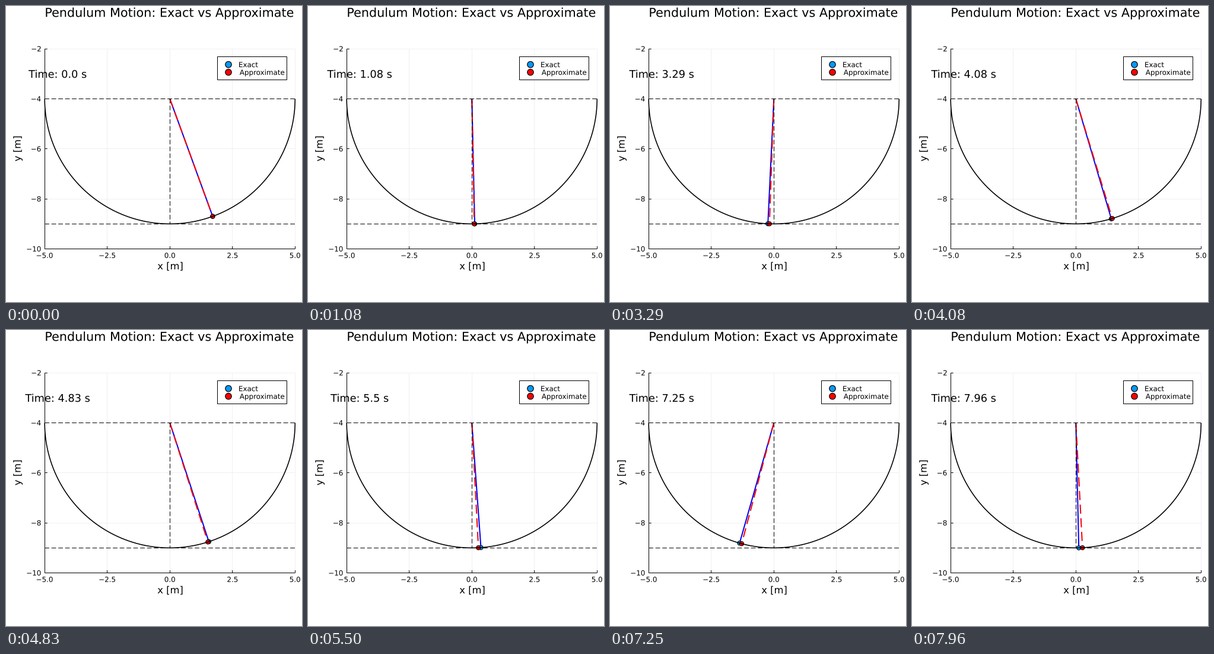
These frames come from a looping animation (499 px wide and 499 px high, 8000 ms). A matplotlib script:

```python
import math

import matplotlib.pyplot as plt
import numpy as np
from matplotlib.animation import FuncAnimation
from matplotlib.patches import Circle, PathPatch, Rectangle
from matplotlib.textpath import TextPath
from matplotlib.transforms import Affine2D

SIZE, DPI = 499, 100
PX = 72 / DPI                      # points per pixel
FPS, STEPS = 24, 192               # simulation rate and length
TICK, FRAMES = 20, 400             # display interval in ms
LENGTH, GRAVITY, START = 5.0, 9.81, math.radians(20)
PIVOT_Y = -4.0
LEFT, RIGHT, TOP, BOTTOM = 65.2, 487.3, 72.2, 409.5
BLUE = (0.0, 0.6056, 0.9787)
GRID = "#f0f0f0"
DASH = (0, (7.7, 3.8))

plt.rcParams["font.family"] = "DejaVu Sans"
fig = plt.figure(figsize=(SIZE / DPI, SIZE / DPI), dpi=DPI, facecolor="white")
ax = fig.add_axes([0, 0, 1, 1])
ax.set_xlim(0, SIZE)
ax.set_ylim(SIZE, 0)
ax.axis("off")


def to_x(x):
    return LEFT + (x + 5) * (RIGHT - LEFT) / 10


def to_y(y):
    return TOP + (-2 - y) * (BOTTOM - TOP) / 8


def crisp(v):
    """Centre of the pixel that holds v."""
    return math.floor(v) + 0.5


def line(xs, ys, color="black", width=1.0, z=2, **kw):
    return ax.plot(xs, ys, color=color, lw=width * PX, zorder=z, snap=False,
                   solid_capstyle="butt", **kw)[0]


def hline(y, x0=LEFT, x1=RIGHT, **kw):
    line([x0, x1], [crisp(y)] * 2, **kw)


def vline(x, y0=TOP, y1=BOTTOM, **kw):
    line([crisp(x)] * 2, [y0, y1], **kw)


def text_path(x, y, text, size, align=0.5, turn=0):
    """Outline of text; align is the part of its width left of x."""
    path = TextPath((0, 0), text, size=size)
    box = path.get_extents()
    shift = -(box.x0 + align * box.width)
    move = Affine2D().translate(shift, 0).scale(1, -1).rotate_deg(turn)
    return move.translate(x, y).transform_path(path)


def label(*args, **kw):
    return ax.add_patch(PathPatch(text_path(*args, **kw), fc="black", lw=0,
                                  snap=False, zorder=9))


def dot(x, y, radius, color, width, z):
    return ax.add_patch(Circle((x, y), radius, fc=color, ec="black",
                               lw=width * PX, zorder=z))


def exact_angles(substeps=20):
    """Integrate the full pendulum equation with RK4, one angle per step."""
    def rate(s):
        return np.array([s[1], -GRAVITY / LENGTH * math.sin(s[0])])

    h = 1 / FPS / substeps
    state, angles = np.array([START, 0.0]), []
    for _ in range(STEPS):
        angles.append(state[0])
        for _ in range(substeps):
            a = rate(state)
            b = rate(state + h / 2 * a)
            c = rate(state + h / 2 * b)
            d = rate(state + h * c)
            state = state + h / 6 * (a + 2 * b + 2 * c + d)
    return angles


# Grid, axes and ticks
for x in (-5, -2.5, 0, 2.5, 5):
    px = to_x(x)
    vline(px, color=GRID, z=0)
    vline(px, BOTTOM - 4.5, BOTTOM)
    label(px, 424.7, f"{x:.1f}".replace("-", "\u2212"), 11.9)
for y in (-2, -4, -6, -8, -10):
    py = to_y(y)
    hline(py, color=GRID, z=0)
    hline(py, LEFT, LEFT + 4.5)
    label(58.5, py + 4.3, f"\u2212{-y}", 11.9, align=1)
vline(LEFT, TOP, BOTTOM + 0.5)
hline(BOTTOM)

label(275.8, 18.3, "Pendulum Motion: Exact vs Approximate", 20.75)
label(276.6, 444, "x [m]", 16.35)
label(24.6, 240.7, "y [m]", 16.35, turn=-90)

# Swing path and guide lines
phi = np.linspace(-math.pi / 2, math.pi / 2, 200)
line(to_x(LENGTH * np.sin(phi)), to_y(PIVOT_Y - LENGTH * np.cos(phi)),
     width=1.6, z=6)
pivot, lowest = to_y(PIVOT_Y), to_y(PIVOT_Y - LENGTH)
hline(pivot, z=6, ls=DASH)
hline(lowest, z=6, ls=DASH)
vline(to_x(0), pivot, lowest, z=6, ls=DASH)

# Legend
ax.add_patch(Rectangle((356.5, 85.5), 117, 39, fc="white", ec="black",
                       lw=PX, snap=False, zorder=7))
for y, color, name, x in ((98.7, BLUE, "Exact", 393.1),
                          (111.7, "red", "Approximate", 393.9)):
    dot(375, y, 5.2, color, 1.2, 8)
    label(x, y + 4.4, name, 11.9, align=0)

# Moving parts
exact_rod = line([], [], "blue", 2, 3)
approx_rod = line([], [], "red", 2, 4, ls=DASH)
exact_bob = dot(0, 0, 3.6, BLUE, 1, 5)
approx_bob = dot(0, 0, 3.6, "red", 1, 5.1)
CLOCK = (86.7, 121)
clock = label(*CLOCK, "Time:", 17.75)

EXACT = exact_angles()
OMEGA = math.sqrt(GRAVITY / LENGTH)


def place(rod, bob, angle):
    x = to_x(LENGTH * math.sin(angle))
    y = to_y(PIVOT_Y - LENGTH * math.cos(angle))
    rod.set_data([to_x(0), x], [pivot, y])
    bob.center = (x, y)


def update(n):
    # Step changes fall on 10 ms marks, rounded from 1/24 s
    step = min(int((n * TICK + 15) * FPS / 1000), STEPS - 1)
    t = step / FPS
    place(exact_rod, exact_bob, EXACT[step])
    place(approx_rod, approx_bob, START * math.cos(OMEGA * t))
    clock.set_path(text_path(*CLOCK, f"Time: {round(t, 2)} s", 17.75))
    return exact_rod, approx_rod, exact_bob, approx_bob, clock


anim = FuncAnimation(fig, update, frames=FRAMES, interval=TICK,
                     init_func=lambda: update(0), repeat=True,
                     repeat_delay=0, blit=False)
plt.show()
```
